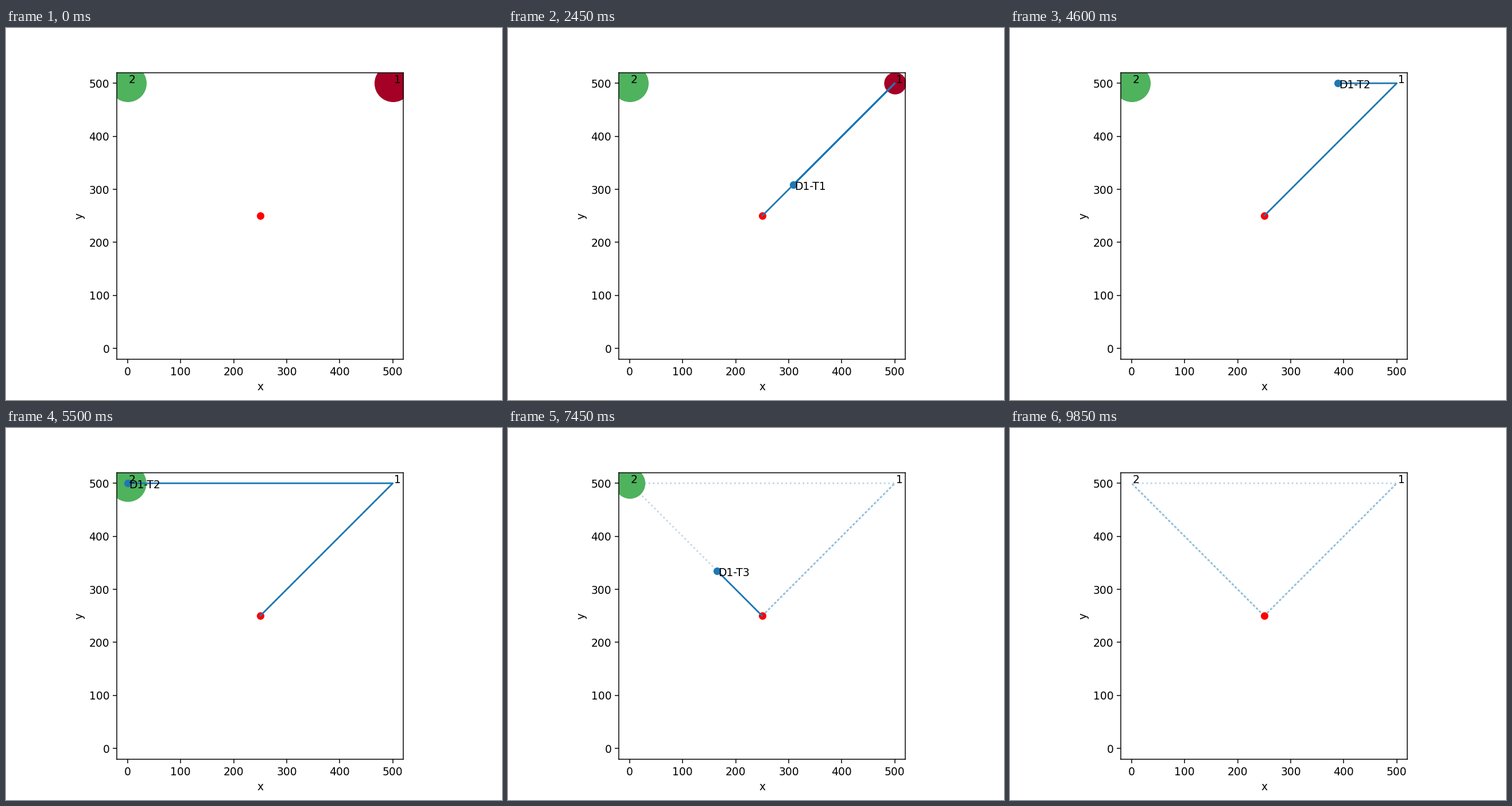
These frames come from a looping animation (864 by 648 pixels, 10000 ms). A matplotlib script:

```python
import math

import matplotlib.pyplot as plt
from matplotlib.animation import FuncAnimation

FRAMES = 200
INTERVAL = 50        # ms
SPEED = 22.5         # data units per frame
UNLOAD = 10.645      # frames per unit of load
RELOAD = 8           # frames spent at the depot between tours
FULL_LOAD = 3        # units wanted by each customer
FULL_AREA = 1136     # marker area of a full demand, pt^2

DEPOT = (250, 250)
SITES = {1: (500, 500), 2: (0, 500)}
COLORS = {1: "#a50026", 2: "#4fb25d"}
BLUE = "#1f77b4"

# Each tour lists (customer, units delivered).
TOURS = [[(1, 2)], [(1, 1), (2, 1)], [(2, 2)]]


def schedule(tours):
    """Turn tours into timed legs and timed deliveries."""
    plans, drops, now = [], [], 0.0
    for tour in tours:
        start, here, legs = now, DEPOT, []
        for site, units in tour + [(None, 0)]:
            there = SITES.get(site, DEPOT)
            arrive = now + math.dist(here, there) / SPEED
            legs.append((now, arrive, here, there))
            now = arrive + units * UNLOAD
            if units:
                drops.append((site, arrive, units))
            here = there
        plans.append((start, now, legs))
        now += RELOAD
    return plans, drops


def clamp(v, low, high):
    return max(low, min(high, v))


def path_until(legs, t):
    """Points travelled so far; the last one is the present place."""
    points = [DEPOT]
    for begin, end, a, b in legs:
        if t <= begin:
            break
        k = clamp((t - begin) / (end - begin), 0, 1)
        points.append((a[0] + k * (b[0] - a[0]), a[1] + k * (b[1] - a[1])))
    return points


PLANS, DROPS = schedule(TOURS)

plt.rcParams["font.family"] = "DejaVu Sans"
fig, ax = plt.subplots(figsize=(6.4, 4.8), dpi=135)
ax.set_aspect("equal")
ax.set_xlim(-20, 520)
ax.set_ylim(-20, 520)
ax.set_xticks(range(0, 501, 100))
ax.set_yticks(range(0, 501, 100))
ax.set_xlabel("x")
ax.set_ylabel("y")

circles = {}
for site, (x, y) in SITES.items():
    circles[site] = ax.scatter(x, y, s=FULL_AREA, c=COLORS[site], zorder=1)
    ax.text(x + 2, y, str(site))

ax.plot(*DEPOT, "o", color="red", zorder=2)
traces = [
    ax.plot(*zip(*path_until(legs, end)), ":", color=BLUE, alpha=0.3, lw=1.5, zorder=0.5)[0]
    for _, end, legs in PLANS
]
route, = ax.plot([], [], color=BLUE, lw=1.5, zorder=2.1)
truck, = ax.plot([], [], "o", color=BLUE, zorder=2.2)
label = ax.text(0, 0, "", zorder=3)


def update(t):
    for site, circle in circles.items():
        left = FULL_LOAD - sum(
            clamp((t - begin) / UNLOAD, 0, units)
            for who, begin, units in DROPS if who == site
        )
        circle.set_visible(left > 1e-6)
        circle.set_sizes([FULL_AREA * max(left, 0) / FULL_LOAD])

    active = False
    for number, (start, end, legs) in enumerate(PLANS, 1):
        traces[number - 1].set_visible(t >= end)
        if start < t < end:
            active = True
            points = path_until(legs, t)
            x, y = points[-1]
            route.set_data(*zip(*points))
            truck.set_data([x], [y])
            label.set_position((x + 2, y - 10))
            label.set_text(f"D1-T{number}")
    for artist in (route, truck, label):
        artist.set_visible(active)
    return [*circles.values(), *traces, route, truck, label]


anim = FuncAnimation(fig, update, frames=FRAMES, interval=INTERVAL,
                     repeat=True, repeat_delay=0, blit=False)
plt.show()
```
